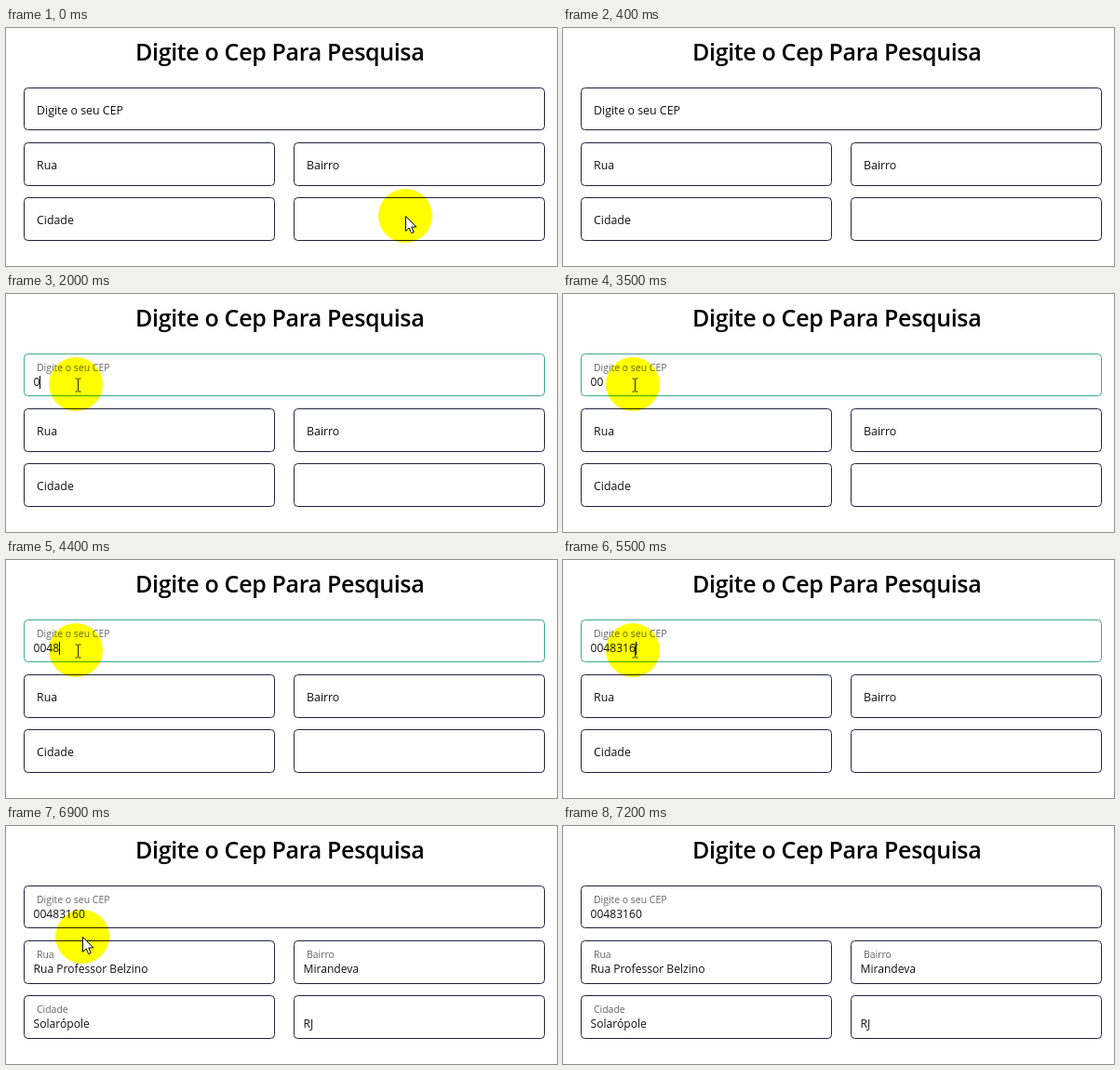
Recreate the animation shown at these times as an HTML page. Size 592 px wide and 256 px high, loop 8200 ms.

```html
<!DOCTYPE html>
<html lang="pt-BR">
<head>
<meta charset="utf-8">
<title>Digite o Cep Para Pesquisa</title>
<style>
  html, body { margin: 0; width: 100%; height: 100%; overflow: hidden; background: #fff; }
  svg { display: block; font-family: "Open Sans", "Noto Sans", sans-serif; fill: #111; }
  .title { font-size: 25px; font-weight: 600; letter-spacing: -.34px; fill: #000; }
  .value { font-size: 12.1px; }
  .box { fill: none; stroke: #212140; }
  .halo { fill: #ff0; mix-blend-mode: multiply; }
</style>
</head>
<body>
<svg id="stage" width="592" height="256" viewBox="0 0 592 256">
  <text class="title" x="139" y="35">Digite o Cep Para Pesquisa</text>
  <g id="form"></g>
  <path id="caret" d="M0 88V102" stroke="#000"/>
  <g id="pointer">
    <circle class="halo" r="29"/>
    <path id="arrow" d="M.5 .5V16.5L4.2 13L6.6 18.6L9.2 17.5L6.8 12H11.8Z" fill="#fff" stroke="#000"/>
    <path id="beam" d="M-.5 -6H2M3 -6H5.5M-.5 8H2M3 8H5.5M2.5 -5.5V7.5" fill="none" stroke="#222"/>
  </g>
</svg>
<script>
const LOOP = 8200, STEP = 100;
const CEP = "00483160", DIGIT = 6.92;
const keyTimes = [2000, 3000, 3900, 4300, 4700, 5100, 5400, 6000];
const inkColor = [33, 33, 64], focusColor = [64, 168, 138];

const $ = id => document.getElementById(id);
const clamp = v => Math.max(0, Math.min(1, v));
const ramp = (t, from, length) => clamp((t - from) / length);
const mix = (a, b, p) => a + (b - a) * p;
const between = (t, a, b) => t >= a && t < b;
const show = (el, on) => el.setAttribute("visibility", on ? "visible" : "hidden");

function add(tag, attrs, text = "") {
  const el = document.createElementNS("http://www.w3.org/2000/svg", tag);
  for (const key in attrs) el.setAttribute(key, attrs[key]);
  el.textContent = text;
  return $("form").appendChild(el);
}

function makeField(x, y, width, height, label, value) {
  return {
    y, text: value,
    box: add("rect", { class: "box", x: x + .5, y: y + .5, width, height, rx: 4 }),
    label: add("text", { x: x + 14 }, label),
    value: add("text", { class: "value", x: x + 10.5, y: y + 35 })
  };
}

const cep = makeField(19, 64, 559, 45, "Digite o seu CEP", "");
const results = [
  makeField(19, 123, 269, 46, "Rua", "Rua Professor Belzino"),
  makeField(309, 123, 269, 46, "Bairro", "Mirandeva"),
  makeField(19, 182, 269, 46, "Cidade", "Solarópole"),
  makeField(309, 182, 269, 46, "", "RJ")
];

// p runs from resting label (0) to floating label (1)
function floatLabel(field, p) {
  field.label.setAttribute("y", field.y + mix(29, 19, p));
  field.label.setAttribute("font-size", mix(12.37, 10.45, p));
  field.label.setAttribute("opacity", mix(1, .65, p));
}

function pointerAt(t) {
  if (t < 400) {
    const p = (t / 400) ** 1.4;
    return [mix(429, 420, p), mix(202, 300, p)];
  }
  if (between(t, 1500, 6900)) {
    const p = 1 - (1 - ramp(t, 1400, 300)) ** 2;
    return [mix(190, 75, p), mix(250, 97, p)];
  }
  if (between(t, 6900, 7200)) {
    const p = ramp(t, 6800, 400) ** 1.6;
    return [mix(75, 140, p), mix(97, 300, p)];
  }
  return null;
}

function draw(t) {
  const typed = keyTimes.filter(k => t >= k).length;
  cep.value.textContent = CEP.slice(0, typed);
  floatLabel(cep, ramp(t, 1650, 100));

  const focus = ramp(t, 1650, 100) * (1 - ramp(t, 6100, 200));
  const stroke = inkColor.map((c, i) => Math.round(mix(c, focusColor[i], focus)));
  cep.box.style.stroke = `rgb(${stroke})`;

  const blinkedOff = between(t, 2700, 3000) || between(t, 3500, 3900);
  show($("caret"), between(t, 1800, 6100) && !blinkedOff);
  $("caret").setAttribute("transform", `translate(${Math.round(29.5 + typed * DIGIT) + .5})`);

  for (const field of results) {
    field.value.textContent = t >= 6150 ? field.text : "";
    floatLabel(field, ramp(t, 6150, 100));
  }

  const at = pointerAt(t);
  show($("pointer"), at);
  if (at) {
    const overInput = between(at[1], 64, 110);
    $("pointer").setAttribute("transform", `translate(${at.map(Math.round)})`);
    $("arrow").style.display = overInput ? "none" : "";
    $("beam").style.display = overInput ? "" : "none";
  }
}

function tick() {
  const t = performance.now() % LOOP;
  draw(Math.floor(t / STEP) * STEP);
  requestAnimationFrame(tick);
}
tick();
</script>
</body>
</html>
```
